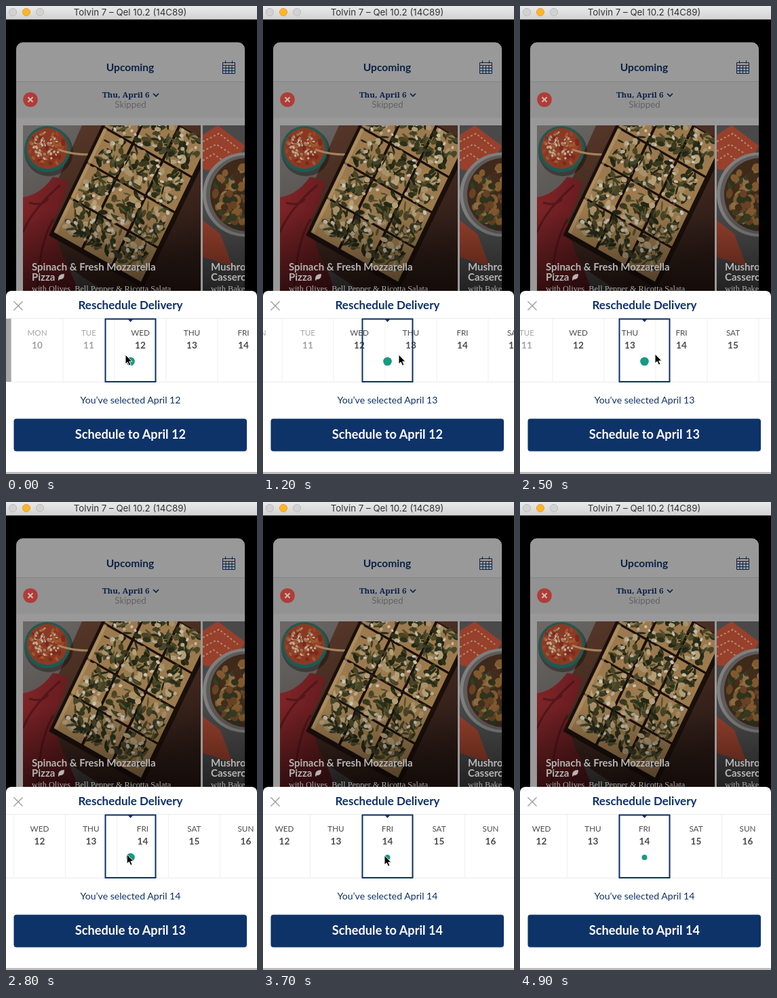
Animation, 370 px wide and 690 px high, one loop 5000 ms. Source, as an HTML page:

```html
<!DOCTYPE html>
<html lang="en">
<head>
<meta charset="utf-8">
<title>Reschedule Delivery</title>
<style>
html, body { margin: 0; width: 100%; height: 100%; overflow: hidden; background: #000; }
svg { display: block; font-family: Lato, "Open Sans", sans-serif; }
.mid { text-anchor: middle; }
.b { font-weight: 700; }
.serif { font-family: "Noto Serif", serif; }
.sub { font: 12.3px "Liberation Serif", serif; fill: #aaa; }
.dish { font-size: 15px; font-weight: 700; fill: #b5b5b5; }
.day { font-size: 11.7px; }
.num { font-size: 13.6px; font-weight: 700; }
</style>
</head>
<body>
<svg width="370" height="690" viewBox="0 0 370 690">
  <defs>
    <linearGradient id="bar" x2="0" y2="1"><stop stop-color="#eaeaea"/><stop offset="1" stop-color="#d3d3d3"/></linearGradient>
    <linearGradient id="table" x2=".6" y2="1"><stop stop-color="#6c6866"/><stop offset="1" stop-color="#3c3836"/></linearGradient>
    <linearGradient id="board" x2=".4" y2="1"><stop stop-color="#5a3a2b"/><stop offset="1" stop-color="#2b1a15"/></linearGradient>
    <linearGradient id="cloth" x2="1" y2=".7"><stop stop-color="#842628"/><stop offset="1" stop-color="#54161a"/></linearGradient>
    <linearGradient id="shade" x2="0" y2="1"><stop offset=".5" stop-opacity="0"/><stop offset="1" stop-opacity=".55"/></linearGradient>
    <clipPath id="left"><path d="M25 176H287V424H25z"/></clipPath>
    <clipPath id="right"><path d="M290 176H352V424H290z"/></clipPath>
    <clipPath id="strip"><path d="M0 461H370V554H0z"/></clipPath>
  </defs>

  <path fill="url(#bar)" d="M0 0H370V19H0z"/>
  <path fill="#aaa" d="M0 19H370V20H0z"/>
  <g stroke-width=".8">
    <circle cx="10" cy="9" r="5.6" fill="#d2d2d2" stroke="#b4b4b4"/>
    <circle cx="30" cy="9" r="5.6" fill="#fdb42c" stroke="#e09b20"/>
    <circle cx="50" cy="9" r="5.6" fill="#d2d2d2" stroke="#b4b4b4"/>
  </g>
  <text class="mid" x="183" y="14" font-size="13.3" fill="#333" style="font-family:Inter,Roboto,sans-serif">Tolvin 7 – Qel 10.2 (14C89)</text>

  <path fill="#999" d="M15 430V63.5a10 10 0 0 1 10-10H342a10 10 0 0 1 10 10V430z"/>
  <path fill="#929292" d="M15 111H352V165H15z"/>
  <path fill="#858585" d="M15 111H352V112H15z"/>
  <text class="mid b" x="183" y="96" font-size="15.6" fill="#0a2148">Upcoming</text>
  <path fill="none" stroke="#0a2148" d="M319.5 83.5h18v16h-18zM319.5 87.5h18m-18 4h18m-18 4h18M324 87.5v12m4.5-12v12m4.5-12v12M323.5 80.5v4m10-4v4"/>
  <circle cx="36" cy="138" r="10.8" fill="#b03c37"/>
  <path stroke="#c9bcbb" stroke-width="2" d="M32.5 134.5l7 7m0-7l-7 7"/>
  <text class="b serif" x="142" y="135" font-size="11.6" fill="#0a2148">Thu, April 6</text>
  <path fill="none" stroke="#0a2148" stroke-width="1.7" d="M217 129l4 4 4-4"/>
  <text class="mid" x="183.5" y="150" font-size="13.3" fill="#626262">Skipped</text>

  <g clip-path="url(#left)">
    <path fill="url(#table)" d="M25 176H287V424H25z"/>
    <path fill="url(#board)" d="M112 176H287V424H150L42 352q-6-6-2-14z"/>
    <path fill="url(#cloth)" d="M25 282q26-4 44-30 16 2 22 8-4 26-22 58 6 24 12 44 14 24 26 62H25z"/>
    <path fill="none" stroke="#3f1015" stroke-width="3" opacity=".6" d="M80 264Q38 300 25 334M70 314Q48 350 46 424M34 290Q54 296 62 284"/>
    <circle cx="63" cy="215" r="36" opacity=".35"/>
    <circle cx="61" cy="211" r="34" fill="#1d5a52"/>
    <circle cx="61" cy="210" r="30" fill="#8a3a24"/>
    <g id="salsa"></g>
    <path fill="none" stroke="#a5835a" stroke-width="3" stroke-linecap="round" d="M78 212q24 8 48 7"/>
    <g id="pizza"></g>
    <path fill="url(#shade)" d="M25 176H287V424H25z"/>
    <text class="dish" x="38" y="389.5">Spinach &amp; Fresh Mozzarella</text>
    <text class="dish" x="38" y="404.5">Pizza</text>
    <path fill="#b5b5b5" d="M77 404q-1-9 9-9 0 9-7 8l-1 2z"/>
    <text class="sub" x="38" y="420.5">with Olives, Bell Pepper &amp; Ricotta Salata</text>
  </g>
  <g clip-path="url(#right)">
    <path fill="#4a494a" d="M290 176H352V424H290z"/>
    <path fill="#97402c" d="M290 190L312 176 352 206 330 250 290 240zM290 316l26 20 18 48-44-14z"/>
    <path fill="none" stroke="#b38a72" stroke-width="2" stroke-dasharray="3 3" d="M290 200l24-12 28 22M290 214l20-10 22 14M290 228l16-10 14 10"/>
    <circle cx="352" cy="278" r="62" fill="#7f7f7e"/>
    <circle cx="353" cy="278" r="58" fill="#5d5b5a"/>
    <circle cx="355" cy="278" r="54" fill="#3f291a"/>
    <g id="casserole"></g>
    <path fill="url(#shade)" d="M290 176H352V424H290z"/>
    <text class="dish" x="302" y="389.5">Mushroom</text>
    <text class="dish" x="302" y="404.5">Casserole</text>
    <text class="sub" x="302" y="420.5">with Baked Rice</text>
  </g>

  <path fill="#bdbdbd" d="M0 680H370V690H0z"/>
  <path fill="#fff" d="M0 687V428a8 8 0 0 1 8-8H362a8 8 0 0 1 8 8V687z"/>
  <path stroke="#999" stroke-width="1.3" d="M11.500 435.500l13 13m0-13l-13 13"/>
  <text class="mid b" x="183.5" y="447" font-size="17" fill="#0e3067">Reschedule Delivery</text>
  <g clip-path="url(#strip)"><g id="days"></g></g>
  <path fill="#ebebeb" d="M0 460H370V461H0zM0 554H370V555H0z"/>
  <circle id="dot" cx="183.5" cy="524" fill="#159a84"/>
  <path fill="none" stroke="#0e3067" stroke-width="2" d="M146.500 461.500H220.500V554H146.500z"/>
  <path fill="#0e3067" d="M179 461h9l-4.500 5z"/>
  <text id="note" class="mid" x="183.5" y="586" font-size="14.1" fill="#0e3067"></text>
  <rect x="11.5" y="608.5" width="343.5" height="48" rx="4" fill="#0e3369"/>
  <text id="action" class="mid b" x="183.5" y="638" font-size="18.2" fill="#fff"></text>
  <path id="cursor" stroke="#fff" d="M0 0V14l3.200-2.900 2.300 5.100 2.500-1.100-2.300-4.900h4.200z"/>
</svg>
<script>
const $ = id => document.getElementById(id);
let seed = 11;
const rnd = (a = 0, b = 1) => {
  seed = (seed * 16807) % 2147483647;
  return a + (b - a) * seed / 2147483647;
};
const pick = list => list[Math.floor(rnd(0, list.length))];
const blob = (x, y, rx, ry, fill) =>
  `<ellipse rx="${rx.toFixed(1)}" ry="${ry.toFixed(1)}" fill="${fill}" transform="translate(${x.toFixed(1)} ${y.toFixed(1)}) rotate(${rnd(0, 180).toFixed()})"/>`;

// Bowls of food: blobs scattered over a disc
function scatter(cx, cy, r, count, size, colors) {
  let out = '';
  for (let i = 0; i < count; i++) {
    const a = rnd(0, 6.283), d = r * Math.sqrt(rnd());
    out += blob(cx + d * Math.cos(a), cy + d * Math.sin(a), rnd(size * .6, size), rnd(size * .4, size * .8), pick(colors));
  }
  return out;
}
$('salsa').innerHTML = scatter(61, 210, 26, 45, 4, ['#97442b', '#7b2a1b', '#a1572f']) +
  scatter(59, 207, 21, 55, 2.4, ['#b8a38c', '#c0b09b', '#a27a5c']);
$('casserole').innerHTML = scatter(354, 278, 48, 130, 8, ['#664325', '#80592f', '#2c331c', '#452b1a', '#8d6b42', '#373c22']);

// Pizza: a skewed grid of slices
const COLS = 3, ROWS = 3;
const spot = (u, v) => [143 + 44 * u - 25 * v, 178 + 25 * u + 52 * v];
const quad = (u0, v0, u1, v1) => [[u0, v0], [u1, v0], [u1, v1], [u0, v1]].map(p => spot(...p).map(n => n.toFixed(1))).join(' ');
function slice(u, v) {
  let out = `<polygon points="${quad(u + .04, v + .03, u + .96, v + .97)}" fill="#9c7a4e"/>`;
  const top = (count, rx, ry, colors) => {
    for (let i = 0; i < count; i++) {
      const [x, y] = spot(u + rnd(u ? .05 : .24, u == COLS - 1 ? .8 : .95), v + rnd(.06, v == ROWS - 1 ? .78 : .94));
      out += blob(x, y, rnd(rx * .6, rx), rnd(ry * .6, ry), pick(colors));
    }
  };
  top(18, 8, 4.5, ['#2c3019', '#39391f', '#232615', '#4a4527']);
  top(9, 7, 5, ['#aa9068', '#997a4f', '#b39e78']);
  top(13, 8, 2, ['#262a17', '#40452a', '#54522e']);
  top(7, 3.6, 2.8, ['#c4bbaa', '#b5a890', '#c9c1b3']);
  return out;
}
let pizza = `<polygon points="${quad(-.05, -1, COLS + .1, ROWS + .1)}" fill="#1a100b"/>`;
for (let v = -1; v < ROWS; v++) for (let u = 0; u < COLS; u++) pizza += slice(u, v);
pizza += `<polygon points="${quad(.05, 0, .14, ROWS - .05)}" fill="#b89a6c" opacity=".6"/>`;
$('pizza').innerHTML = pizza;

// Day strip, with the 12th centred on x = 0
const PITCH = 76, CENTER = 183.5;
const names = ['SUN', 'MON', 'TUE', 'WED', 'THU', 'FRI', 'SAT', 'SUN', 'MON'];
$('days').innerHTML = names.map((name, i) => {
  const date = 9 + i, x = (date - 12) * PITCH, off = date < 12;
  return (date < 10 ? `<path fill="#a6a6a6" d="M${x - 38} 461h76v93h-76z"/>` : '') +
    `<path fill="#efefef" d="M${x + 37.5} 461h1v93h-1z"/>` +
    `<text class="mid day" x="${x}" y="486" fill="${off ? '#a6a6a6' : '#4c4c4c'}">${name}</text>` +
    `<text class="mid num" x="${x}" y="505" fill="${off ? '#a0a0a0' : '#4a4a4a'}">${date}</text>`;
}).join('');

// Keys are [ms, value, value...]
const scroll = [[0, 198], [100, 192], [200, 187.5], [300, 185], [500, 183.5], [900, 183.5], [1050, 168], [1200, 142],
  [1350, 123], [1500, 115], [1800, 109.5], [2000, 107.5], [2400, 107.5], [2500, 86], [2600, 68], [2750, 51],
  [3000, 43], [3200, 40], [3300, 36], [3400, 33.5], [3600, 31.5]];
const mouse = [[0, 176, 514], [300, 178, 514], [800, 236, 513], [900, 237, 513], [1200, 200, 514], [1400, 184, 517],
  [1800, 186, 518], [2000, 192, 517], [2300, 220, 513], [2400, 220, 513], [2500, 199, 513], [2700, 178, 519], [3200, 179, 521]];
function at(keys, t) {
  const i = keys.findIndex(k => k[0] > t);
  if (i < 0) return keys[keys.length - 1].slice(1);
  const a = keys[i - 1], b = keys[i], p = (t - a[0]) / (b[0] - a[0]);
  return a.slice(1).map((n, j) => n + (b[j + 1] - n) * p);
}
const dateAt = x => 12 + Math.round((CENTER - x) / PITCH);

function draw(now) {
  const t = Math.floor(now % 5000 / 100) * 100;
  const [x] = at(scroll, t), [mx, my] = at(mouse, t), date = dateAt(x);
  const away = Math.abs(x + (date - 12) * PITCH - CENTER);
  $('days').setAttribute('transform', `translate(${x})`);
  $('dot').setAttribute('r', 4 + 2.3 * Math.min(1, away / 12));
  $('note').textContent = `You’ve selected April ${date}`;
  $('action').textContent = `Schedule to April ${dateAt(at(scroll, Math.max(0, t - 300))[0])}`;
  $('cursor').setAttribute('transform', `translate(${mx} ${my})`);
  $('cursor').style.display = t < 3800 ? '' : 'none';
  requestAnimationFrame(() => draw(performance.now() - start));
}
const start = performance.now();
draw(0);
</script>
</body>
</html>
```
